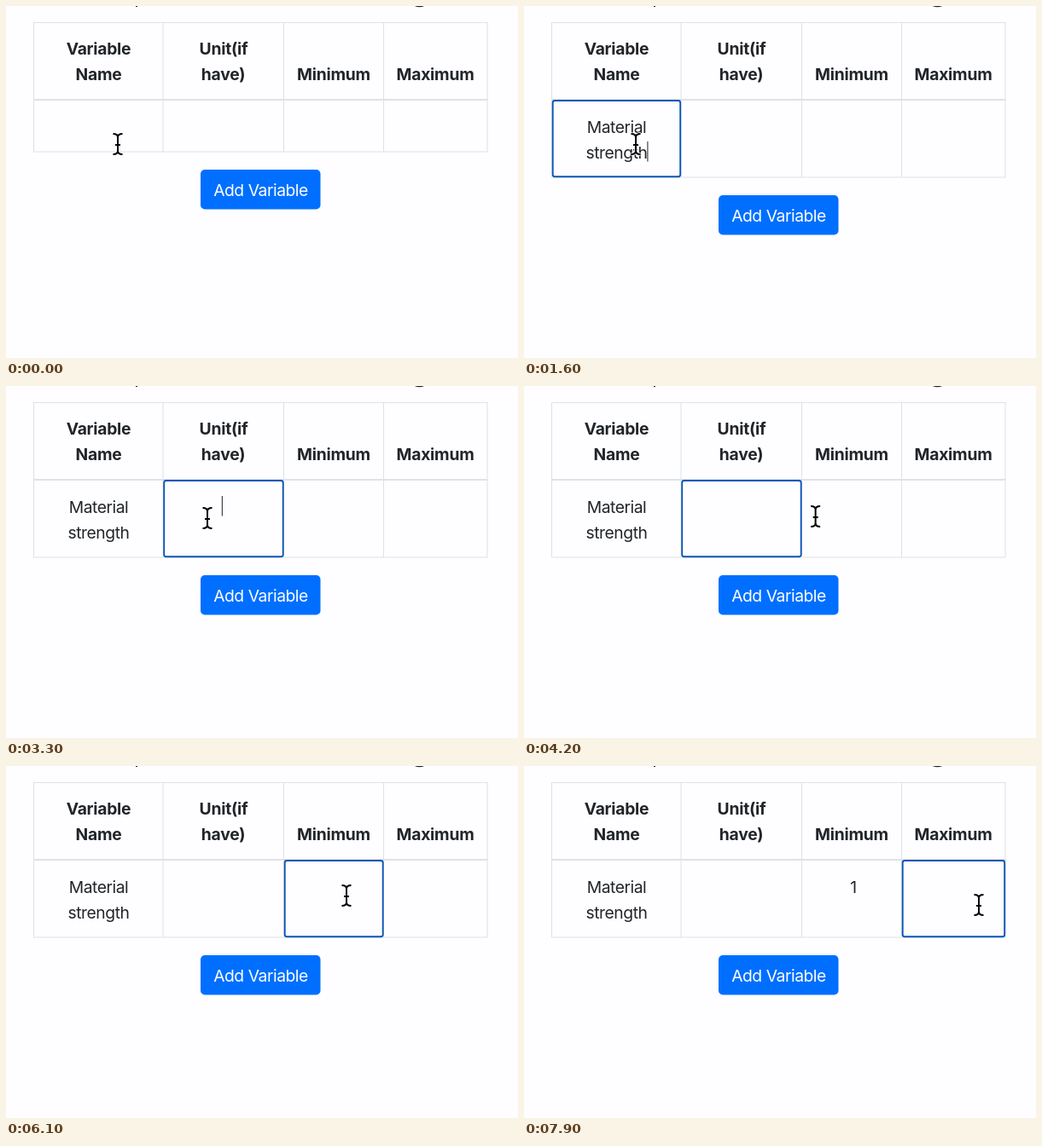
Recreate the animation shown at these times as an HTML page. Size 600 by 413 pixels, loop 8 s.

```html
<!DOCTYPE html>
<html lang="en">
<head>
<meta charset="utf-8">
<title>Add variable</title>
<style>
  html, body { margin: 0; width: 100%; height: 100%; overflow: hidden; background: #fefdff; }
  svg { display: block; width: 600px; height: 413px; }
  text { font: 19.3px Inter, "Open Sans", sans-serif; letter-spacing: -.45px; text-anchor: middle; fill: #212529; }
  .head text { font-weight: 700; letter-spacing: -.25px; }
  .grid { fill: none; stroke: #dee2e6; }
  .halo { stroke: #fff; stroke-width: 3.6; }
</style>
</head>
<body>
<svg viewBox="0 0 600 413">
  <g fill="none" stroke="#212529" stroke-width="2">
    <path d="M153 -1V1"/>
    <path d="M479 -1Q484.500 1.500 490 -1"/>
  </g>
  <path id="grid" class="grid"/>
  <path class="grid" d="M32 110H564.500" stroke-width="1.800"/>
  <g class="head">
    <text x="108.500" y="57">Variable</text><text x="108.500" y="87">Name</text>
    <text x="255" y="57">Unit(if</text><text x="254.500" y="87">have)</text>
    <text x="384" y="87">Minimum</text>
    <text x="503" y="87">Maximum</text>
  </g>
  <rect id="ring" y="111" rx="2.500" fill="none" stroke="#0b57b7" stroke-width="1.900"/>
  <text id="line1" x="108.500" y="149"></text>
  <text id="line2" x="108.500" y="179"></text>
  <text id="minimum" x="386" y="149"></text>
  <rect id="caret" width="1.200" height="23.500" fill="#444"/>
  <g id="button">
    <rect x="228" y="192" width="140.500" height="46.500" rx="5" fill="#006fff"/>
    <text x="298.500" y="222.500" style="fill:#fff">Add Variable</text>
  </g>
  <g id="beam" fill="none" stroke="#000" stroke-width="2">
    <path class="halo" d="M-5.500 -12Q0 -12 0 -8V8Q0 12 -5.500 12M5.500 -12Q0 -12 0 -8M0 8Q0 12 5.500 12M-3 1H3"/>
    <path d="M-5.500 -12Q0 -12 0 -8V8Q0 12 -5.500 12M5.500 -12Q0 -12 0 -8M0 8Q0 12 5.500 12M-3 1H3"/>
  </g>
  <path id="arrow" d="M0 0V20.500L4.600 16.300L8.200 24.800L11.800 23.300L8.200 15H14.300Z"
    stroke="#fff" stroke-width="2.200" paint-order="stroke" style="filter:drop-shadow(0 1px 1px #0005)"/>
</svg>
<script>
const LOOP = 8000, BLINK = 500;
const edges = [32.5, 184, 325.5, 442.5, 564];
const caretCenters = [108.5, 253, 386, 503];
// [time, focused column], -1 for none
const focusChanges = [[0, -1], [600, 0], [2300, 1], [4500, 2], [6900, -1], [7300, 3]];
// [time, first line, second line]
const typing = [
  [0, "", ""], [1000, "Mat", ""], [1100, "Mater", ""], [1200, "Material", ""],
  [1300, "Material s", ""], [1400, "Material str", ""], [1600, "Material", "strength"]
];
const MINIMUM_TYPED = 6300;
// [time, x, y]
const pointerPath = [
  [0, 131, 162], [1900, 131, 162], [2300, 236, 155], [3900, 236, 155], [4400, 399, 152],
  [6600, 399, 152], [6900, 583, 162], [7000, 583, 162], [7300, 533, 163], [LOOP, 533, 163]
];
const blinkResets = [...focusChanges, ...typing, [MINIMUM_TYPED]].map(([time]) => time);

const $ = id => document.getElementById(id);
const latest = (list, t) => list.filter(([time]) => time <= t).pop();
const show = (el, visible) => el.setAttribute("visibility", visible ? "visible" : "hidden");
const set = (el, attrs) => Object.entries(attrs).forEach(([k, v]) => el.setAttribute(k, v));

function pointerAt(t) {
  const i = pointerPath.findIndex(([time]) => time > t);
  const [t0, x0, y0] = pointerPath[i - 1], [t1, x1, y1] = pointerPath[i];
  const p = (t - t0) / (t1 - t0), ease = p * p * (3 - 2 * p);
  return [x0 + (x1 - x0) * ease, y0 + (y1 - y0) * ease];
}

function drawCaret(t, column, line) {
  const reset = Math.max(...blinkResets.filter(time => time <= t));
  show($("caret"), column >= 0 && (t - reset) % (2 * BLINK) < BLINK);
  if (column < 0) return;
  const width = line && line.textContent ? line.getComputedTextLength() : 0;
  const y = line === $("line2") ? 159 : 129;
  set($("caret"), { x: caretCenters[column] + width / 2 - .2, y });
}

function draw(t) {
  const [, first, second] = latest(typing, t);
  const column = latest(focusChanges, t)[1];
  const bottom = second ? 201 : 171;

  $("line1").textContent = first;
  $("line2").textContent = second;
  $("minimum").textContent = t >= MINIMUM_TYPED ? "1" : "";

  set($("grid"), { d: edges.map(x => `M${x} 19V${bottom}`).join("") + `M32 19.500H564.500M32 ${bottom}H564.500` });
  set($("button"), { transform: `translate(0 ${bottom - 171})` });

  show($("ring"), column >= 0);
  if (column >= 0) {
    set($("ring"), { x: edges[column] + 1.2, width: edges[column + 1] - edges[column] - 2, height: bottom - 111.7 });
  }
  drawCaret(t, column, [second ? $("line2") : $("line1"), null, $("minimum"), null][column]);

  const [x, y] = pointerAt(t), outside = x > edges[4];
  show($("beam"), !outside);
  show($("arrow"), outside);
  set($(outside ? "arrow" : "beam"), { transform: `translate(${x} ${y})` });
}

function tick() {
  draw(Math.floor(performance.now() % LOOP / 100) * 100);
  requestAnimationFrame(tick);
}
tick();
</script>
</body>
</html>
```
